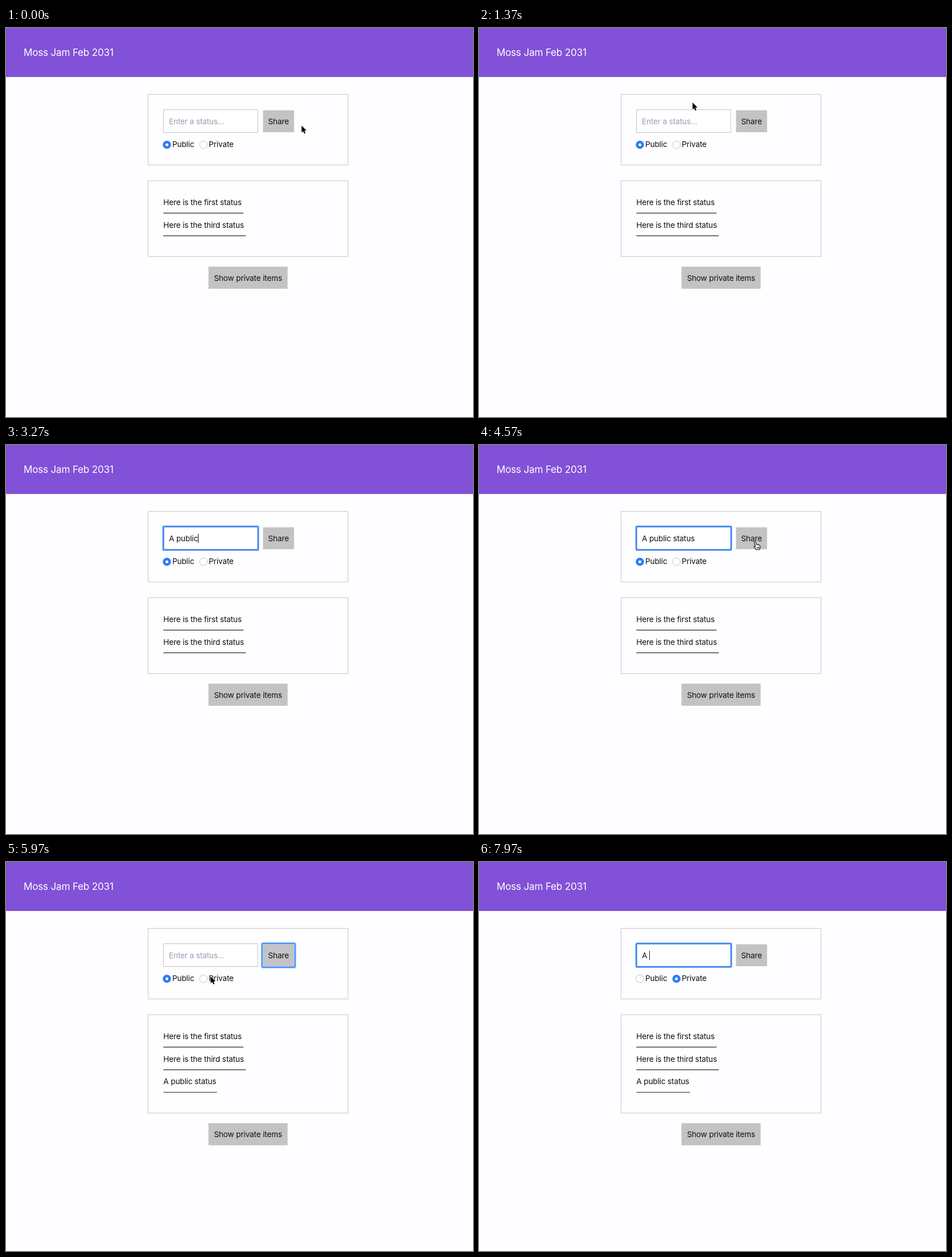
Animation, 820 px wide and 683 px high, one loop 8000 ms. Source, as an HTML page:

```html
<!DOCTYPE html>
<html lang="en">
<head>
<meta charset="utf-8">
<title>Status sharing</title>
<style>
  html, body { margin: 0; width: 100%; height: 100%; overflow: hidden; background: #fefdff; }
  svg { display: block; }
  text { font: 13.65px Inter, "Open Sans", sans-serif; letter-spacing: -.17px; white-space: pre; fill: #111; }
  .title { font-size: 17.1px; letter-spacing: -.2px; fill: #fff; }
  .middle { text-anchor: middle; }
  .hint { fill: #92a0b3; }
  .panel { fill: none; stroke: #cbcacc; stroke-width: 1.1; }
  .field { fill: #fff; stroke: #c6c5c8; stroke-width: 1.1; }
  .button { fill: #c3c2c4; }
  .rule { stroke: #4b4a4d; stroke-width: 1.4; }
  .halo { fill: none; stroke: #9fc6fb; stroke-width: 3.8; }
  .ring { fill: none; stroke: #4287ea; stroke-width: 2.2; }
  #shareRing .ring { stroke: #4b97fb; }
  .off { fill: #fff; stroke: #c4c3c7; }
  .on { fill: #2d7bf6; }
</style>
</head>
<body>
<svg width="820" height="683" viewBox="0 0 820 683">
  <rect width="820" height="683" fill="#fefdff"/>
  <rect width="820" height="86" fill="#8151d7"/>
  <text class="title" x="31" y="48.5">Moss Jam Feb 2031</text>

  <rect class="panel" x="249.5" y="116.5" width="351" height="124"/>
  <rect class="field" x="276.5" y="143.5" width="165.5" height="40"/>
  <g id="fieldRing">
    <rect class="halo" x="276.2" y="143.2" width="166.6" height="41" rx="1.5"/>
    <rect class="ring" x="276.2" y="143.2" width="166.6" height="41" rx="1.5"/>
  </g>
  <text id="hint" class="hint" x="286" y="169">Enter a status...</text>
  <text id="entry" x="286" y="169"></text>
  <rect id="caret" y="156" width="1" height="16" fill="#111"/>

  <rect class="button" x="451.3" y="144.5" width="54.5" height="38.5"/>
  <g id="shareRing">
    <rect class="halo" x="449.6" y="142.8" width="58" height="42" rx="2"/>
    <rect class="ring" x="449.6" y="142.8" width="58" height="42" rx="2"/>
  </g>
  <text class="middle" x="478.5" y="169">Share</text>

  <circle class="off" cx="282.5" cy="205" r="6.7"/>
  <circle class="off" cx="346.7" cy="205" r="6.7"/>
  <g id="dot">
    <circle class="on" cy="205" r="7.1"/>
    <circle cy="205" r="2.5" fill="#fff"/>
  </g>
  <text x="292" y="208.8">Public</text>
  <text x="356" y="208.8">Private</text>

  <rect id="list" class="panel" x="249.5" y="268" width="351" height="133.3"/>
  <text x="276.3" y="311">Here is the first status</text>
  <path class="rule" d="M276.3 325H417"/>
  <text x="276.3" y="350.5">Here is the third status</text>
  <path class="rule" d="M276.3 364.7H421"/>
  <g id="added">
    <text x="276.3" y="390">A public status</text>
    <path class="rule" d="M276.3 404.4H370.5"/>
  </g>
  <g id="reveal">
    <rect class="button" x="355.5" y="419" width="139" height="38.8"/>
    <text class="middle" x="425" y="443.6">Show private items</text>
  </g>

  <g id="pointer">
    <path id="arrow" fill="#000" stroke="#fff" stroke-width=".9" paint-order="stroke"
      d="M0 0V12L2.7 9.5 4.6 13.9 6.8 13 4.9 8.7 8.6 8.5Z"/>
    <path id="hand" fill="#fff" stroke="#111" stroke-width="1.1" stroke-linejoin="round" transform="translate(-3.5 -1)"
      d="M2.2 1.2c1-.7 2 0 2.3 1l1.2 4c.2-.9 2-.9 2.2.3.5-.7 1.9-.5 2.1.5.6-.5 1.8-.1 1.9 1l.2 3.2c0 1-.8 2-.9 3.6h-6c-.6-1.6-2.4-3-3.8-4.8-.7-1 .6-1.9 1.5-1.1l1.2 1-2.2-6.9c-.3-.8-.2-1.4.3-1.8zM6.6 10.2v2.6M8.4 10.2v2.6M10.1 10.2v2.6"/>
    <path id="beam" fill="none" stroke="#222" d="M-2.5-7.5Q0-7.5 0-6V6Q0 7.5-2.5 7.5M2.5-7.5Q0-7.5 0-6M0 6Q0 7.5 2.5 7.5M-1.5 2.5h3"/>
  </g>
</svg>
<script>
const LOOP = 8000, SHARE = 4850, PICK = 6300, BLINK = 500;

// Pointer stops: time, x, y
const stops = [
  [0, 519, 171.5], [250, 519, 171.5], [750, 462, 150], [1250, 375, 131], [1500, 375, 131],
  [1800, 366, 161], [4200, 366, 163], [4520, 485, 170], [5070, 486, 169.5], [5400, 486, 169.5],
  [6100, 347, 204], [6400, 347, 204], [6700, 362, 203], [6860, 362, 203], [7180, 357, 165], [8000, 357, 165]
];
// Spells in the field: focus, first key, key interval, blur, text
const entries = [
  { focus: 1950, start: 2300, step: 125, end: SHARE, text: "A public status" },
  { focus: 7300, start: 7700, step: 150, end: LOOP, text: "A " }
];
const hidden = [[2300, 4200], [7700, LOOP]];

const el = {};
document.querySelectorAll("[id]").forEach(node => el[node.id] = node);
const show = (node, on) => node.style.display = on ? "" : "none";
const within = (t, [from, to]) => t >= from && t < to;

function pointerAt(t) {
  const i = stops.findIndex(s => s[0] > t);
  const [t0, x0, y0] = stops[i - 1], [t1, x1, y1] = stops[i];
  const u = (t - t0) / (t1 - t0), k = u * u * (3 - 2 * u);
  return [x0 + (x1 - x0) * k, y0 + (y1 - y0) * k];
}

function drawPointer(t) {
  const [x, y] = pointerAt(t);
  const inRow = y > 143 && y < 184;
  const shape = inRow && x > 451 && x < 506 ? "hand" : inRow && x > 276 && x < 442 ? "beam" : "arrow";
  for (const name of ["arrow", "hand", "beam"]) show(el[name], name === shape);
  el.pointer.setAttribute("transform", `translate(${x} ${y})`);
  show(el.pointer, !hidden.some(span => within(t, span)));
}

function drawField(t) {
  const entry = entries.find(e => within(t, [e.focus, e.end]));
  let typed = "", caretOn = false;
  if (entry) {
    const { focus, start, step, text } = entry;
    const count = Math.max(0, Math.min(text.length, Math.floor((t - start) / step) + 1));
    const lastKey = count ? start + (count - 1) * step : focus;
    typed = text.slice(0, count);
    caretOn = Math.floor((t - lastKey) / BLINK) % 2 === 0;
  }
  el.entry.textContent = typed;
  el.caret.setAttribute("x", 286 + (typed ? el.entry.getComputedTextLength() : 0));
  show(el.caret, caretOn);
  show(el.hint, !typed);
  show(el.fieldRing, entry);
}

function draw(t) {
  const shared = t >= SHARE;
  drawField(t);
  drawPointer(t);
  show(el.shareRing, within(t, [SHARE, PICK]));
  show(el.added, shared);
  el.list.setAttribute("height", shared ? 172.8 : 133.3);
  el.reveal.setAttribute("transform", `translate(0 ${shared ? 39.6 : 0})`);
  el.dot.setAttribute("transform", `translate(${t < PICK ? 282.5 : 346.7} 0)`);
}

const begin = performance.now();
function tick() {
  draw((performance.now() - begin) % LOOP);
  requestAnimationFrame(tick);
}
tick();
</script>
</body>
</html>
```
